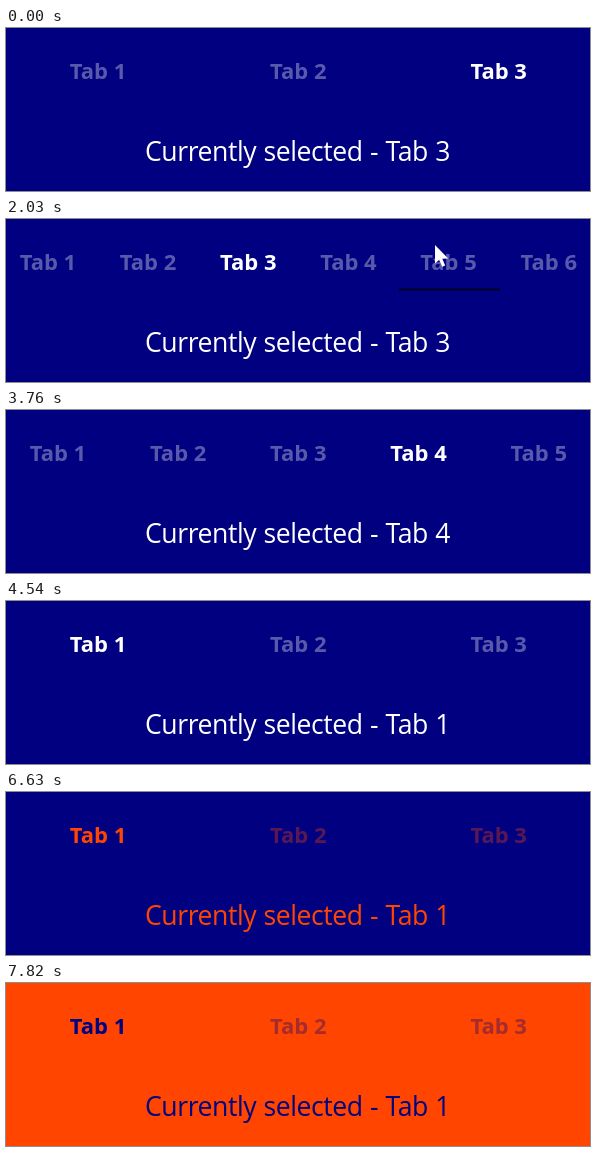
Recreate the animation shown at these times as an HTML page. Size 584 by 163 pixels, loop 8 s.

```html
<!DOCTYPE html>
<html lang="en">
<head>
<meta charset="utf-8">
<title>Tab bar</title>
<style>
  html, body { margin: 0; width: 100%; height: 100%; overflow: hidden; background: #000080; }
  svg { display: block; width: 584px; height: 163px; }
  text { font-family: "Open Sans", "Noto Sans", sans-serif; white-space: pre; }
  .tab { font-size: 22px; font-weight: 700; }
  #label { font-size: 26.6px; letter-spacing: -.43px; word-spacing: .9px; }
</style>
</head>
<body>
<svg viewBox="0 0 584 163">
  <rect id="back" width="584" height="163"/>
  <g id="tabs"></g>
  <rect id="line" y="69.5" height="2" fill="#000" opacity=".75"/>
  <text id="label" x="139" y="133"></text>
  <path id="pointer" fill="#fff" d="M0 0V18.5L4.2 14.8L7.2 21.8L10.2 20.4L7.3 13.8L13.2 13.4Z"/>
</svg>
<script>
const LOOP = 8000;
const NAVY = '#000080', ORANGE = '#ff4500', WHITE = '#ffffff';
const BAR = { x: -8.4, width: 601, top: 16, bottom: 71 };

// Each track is a list of [start time, value]; values change at once.
const tracks = {
  count: [[0, 3], [620, 0], [690, 4], [1080, 5], [1390, 0], [1480, 6],
          [3760, 5], [4000, 0], [4090, 4], [4540, 3]],
  selected: [[0, 3], [2813, 4], [4540, 1]],
  ink: [[0, WHITE], [6030, NAVY], [6630, ORANGE], [7820, NAVY]],
  back: [[0, NAVY], [7270, ORANGE]]
};

// Pointer waypoints: [step, x, y]
const MOVE = { start: 1630, step: 78.9, end: 18 };
const path = [[0, 205, 121], [1, 215, 85], [2, 250, 60], [3, 320, 42], [5, 429, 26],
              [7, 438, 1], [10, 432, 11], [11, 385, 22], [14, 343, 42], [15, 343, 42],
              [16, 280, 80], [17, 188, 111]];

const $ = id => document.getElementById(id);
const at = (track, t) => track.filter(k => k[0] <= t).pop()[1];

const tabs = Array.from({ length: 6 }, (_, i) => {
  const el = document.createElementNS('http://www.w3.org/2000/svg', 'text');
  el.setAttribute('class', 'tab');
  el.setAttribute('y', 51);
  el.textContent = `Tab ${i + 1}`;
  return $('tabs').appendChild(el);
});

function pointerAt(t) {
  const step = Math.floor((t - MOVE.start) / MOVE.step);
  if (step < 0 || step >= MOVE.end) return null;
  const next = path.findIndex(p => p[0] >= step);
  const b = path[next], a = path[Math.max(0, next - 1)];
  const f = b[0] === a[0] ? 1 : (step - a[0]) / (b[0] - a[0]);
  return { x: a[1] + (b[1] - a[1]) * f, y: a[2] + (b[2] - a[2]) * f };
}

function show(el, on) {
  el.setAttribute('visibility', on ? 'visible' : 'hidden');
}

function draw(t) {
  const count = at(tracks.count, t);
  const selected = at(tracks.selected, t);
  const ink = at(tracks.ink, t);
  const cell = BAR.width / (count || 1);

  $('back').setAttribute('fill', at(tracks.back, t));
  tabs.forEach((el, i) => {
    show(el, i < count);
    el.setAttribute('x', BAR.x + (i + .5) * cell - 28);
    el.setAttribute('fill', ink);
    el.setAttribute('opacity', i + 1 === selected ? 1 : .35);
  });
  $('label').textContent = `Currently selected - Tab ${selected}`;
  $('label').setAttribute('fill', ink);

  const p = pointerAt(t);
  const hover = p && p.y > BAR.top && p.y < BAR.bottom;
  show($('pointer'), p);
  show($('line'), hover);
  if (p) $('pointer').setAttribute('transform', `translate(${p.x} ${p.y})`);
  if (hover) {
    const i = Math.floor((p.x - BAR.x) / cell);
    $('line').setAttribute('x', BAR.x + i * cell + .5);
    $('line').setAttribute('width', cell + 1);
  }
}

const begin = performance.now();
function tick() {
  draw((performance.now() - begin) % LOOP);
  requestAnimationFrame(tick);
}
draw(0);
requestAnimationFrame(tick);
</script>
</body>
</html>
```
